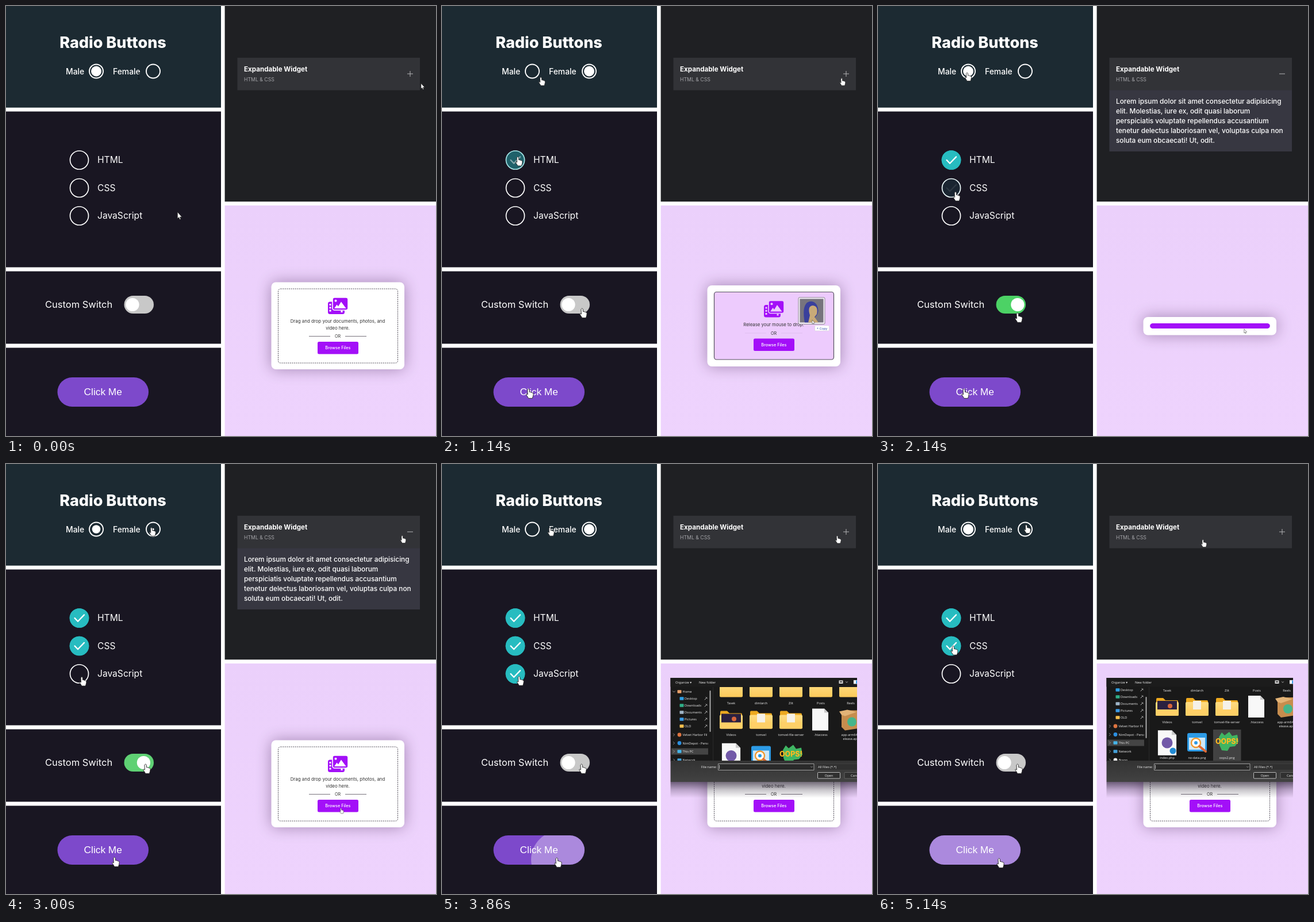
These frames come from a looping animation (748x748 px, 5280 ms). An HTML page with a canvas:

```html
<!DOCTYPE html>
<html lang="en">
<head>
<meta charset="utf-8">
<title>UI widgets</title>
<style>
html, body { margin: 0; width: 100%; height: 100%; overflow: hidden; background: #fff; }
canvas { display: block; }
</style>
</head>
<body>
<canvas id="stage" width="748" height="748"></canvas>
<script>
const ctx = document.getElementById('stage').getContext('2d');
const LOOP = 5280, STEPS = 37;
const PURPLE = '#a30ff8', TEAL = '#27bcc0', NIGHT = '#191622';
const UI = 'Inter, sans-serif', SYS = '"Open Sans", sans-serif', ARIAL = '"Liberation Sans", Arial, sans-serif';

// ---------- helpers ----------
const ramp = (k, start, len) => Math.max(0, Math.min(1, (k - start) / len));
const mix = (a, b, p) => a + (b - a) * p;
const mixRgb = (a, b, p) => `rgb(${a.map((v, i) => Math.round(mix(v, b[i], p)))})`;

function rect(x, y, w, h, fill, r = 0, stroke, lw = 1) {
  ctx.beginPath();
  ctx.roundRect(x, y, w, h, r);
  paint(fill, stroke, lw);
}
function circle(x, y, r, fill, stroke, lw = 1) {
  ctx.beginPath();
  ctx.arc(x, y, Math.max(0, r), 0, 7);
  paint(fill, stroke, lw);
}
function shape(d, x, y, scale, fill, stroke, lw = 1) {
  ctx.save();
  ctx.translate(x, y);
  ctx.scale(scale, scale);
  const p = new Path2D(d);
  ctx.lineJoin = ctx.lineCap = 'round';
  if (fill) { ctx.fillStyle = fill; ctx.fill(p); }
  if (stroke) { ctx.strokeStyle = stroke; ctx.lineWidth = lw; ctx.stroke(p); }
  ctx.restore();
}
function paint(fill, stroke, lw) {
  if (fill) { ctx.fillStyle = fill; ctx.fill(); }
  if (stroke) { ctx.strokeStyle = stroke; ctx.lineWidth = lw; ctx.stroke(); }
}
function fade(y0, y1, ...colors) {
  const g = ctx.createLinearGradient(0, y0, 0, y1);
  colors.forEach((c, i) => g.addColorStop(i / (colors.length - 1), c));
  return g;
}
// y is the middle of the capitals
function text(s, x, y, size, { color = '#fff', weight = 400, align = 'left', font = UI } = {}) {
  ctx.font = `${weight} ${size}px ${font}`;
  ctx.textAlign = align;
  ctx.fillStyle = color;
  ctx.fillText(s, x, y + size * .36);
}
function clipped(x, y, w, h, draw, r = 0) {
  ctx.save();
  ctx.beginPath();
  ctx.roundRect(x, y, w, h, r);
  ctx.clip();
  draw();
  ctx.restore();
}
// keys: [step, x, y, kind]; returns the interpolated place or null
function along(keys, k) {
  if (k < keys[0][0]) return null;
  const i = keys.findLastIndex(key => key[0] <= k);
  const a = keys[i], b = keys[i + 1] || a;
  const p = b === a ? 0 : (k - a[0]) / (b[0] - a[0]);
  return { x: mix(a[1], b[1], p), y: mix(a[2], b[2], p), kind: a[3] };
}

// ---------- pointers ----------
const POINTERS = {
  hand: 'M-3.5 -6Q-2 -8.5 -.7 -6L-.5 -2Q1 -3 2 -1.5Q3.5 -2 4 -.8Q5.5 -1 5.5 1L5 4L4 7.5H-2L-5.5 2Q-6 0 -3.5 1.5Z',
  arrow: 'M-3.5 -6V4.5L-1.3 2.6L.3 6L2 5.3L.5 2L3.6 1.8Z',
  beam: 'M-1.5 -5H1.5M0 -5V5M-1.5 5H1.5'
};
const TRACKS = {
  radio: [[0, 231, 122, 'beam'], [1, 240, 119, 'hand'], [3, 255, 117, 'hand'], [5, 255, 117, 'hand'],
    [8, 174, 131, 'hand'], [11, 157, 120, 'hand'], [15, 157, 123, 'hand'], [17, 180, 120, 'hand'],
    [20, 255, 118, 'hand'], [25, 255, 117, 'hand'], [28, 157, 118, 'hand'], [32, 157, 118, 'hand'], [36, 260, 113, 'hand']],
  checks: [[0, 302, 365, 'arrow'], [2, 260, 340, 'arrow'], [6, 134, 270, 'hand'], [9, 134, 270, 'hand'],
    [13, 137, 328, 'hand'], [15, 137, 331, 'hand'], [18, 134, 378, 'hand'], [25, 134, 378, 'hand'],
    [30, 140, 376, 'hand'], [33, 138, 374, 'hand'], [36, 133, 324, 'hand']],
  toggle: [[3, 250, 546, 'arrow'], [4, 248, 540, 'hand'], [8, 246, 534, 'hand'], [15, 245, 542, 'hand'], [20, 245, 530, 'hand']],
  button: [[3, 150, 688, 'hand'], [6, 153, 674, 'hand'], [15, 152, 674, 'hand'], [19, 191, 692, 'hand'],
    [25, 191, 692, 'hand'], [29, 213, 694, 'hand']],
  widget: [[0, 725, 140, 'arrow'], [2, 716, 136, 'hand'], [5, 697, 132, 'hand'], [10, 697, 132, 'hand'],
    [13, 728, 140], [18, 724, 150, 'arrow'], [19, 706, 136, 'hand'], [20, 691, 131, 'hand'], [25, 691, 131, 'hand'],
    [30, 687, 132, 'hand'], [33, 685, 132, 'hand'], [36, 567, 138, 'hand']],
  upload: [[9, 644, 549, 'arrow'], [15, 639, 566, 'arrow'], [17, 630, 575, 'arrow'], [20, 584, 604, 'hand'],
    [23, 584, 602, 'arrow'], [26, 584, 602]]
};
function pointer(name, k, scale = 1) {
  const at = along(TRACKS[name], k);
  if (!at || !at.kind) return;
  const beam = at.kind === 'beam';
  shape(POINTERS[at.kind], at.x, at.y, scale, beam ? null : '#fff', beam ? '#0a1014' : '#222', .8);
}

// ---------- left column ----------
function radios(k) {
  rect(0, 0, 374, 176.7, '#1c2a32');
  text('Radio Buttons', 186, 63.5, 27, { weight: 800, align: 'center' });
  const clicks = [3, 12, 20.7, 28.5], lens = [2, 2, 1.6, 1.5];
  const female = clicks.reduce((sum, c, i) => sum + ramp(k, c, lens[i]) * (i % 2 ? -1 : 1), 0);
  [['Male', 104, 157, 1 - female], ['Female', 186, 256, female]].forEach(([label, tx, cx, on], i) => {
    text(label, tx, 113.5, 13.9, { weight: 500 });
    const pressed = clicks.some((c, n) => n % 2 !== i && k - c > .5 && k - c < 2);
    if (pressed) circle(cx, 113.5, 18, 'rgba(255,255,255,.33)');
    circle(cx, 113.5, 12, null, '#fff', 1.9);
    circle(cx, 113.5, 9 * on, '#fff');
  });
  pointer('radio', k);
}

function checks(k) {
  rect(0, 183.6, 374, 270.9, NIGHT);
  const on = [ramp(k, 7.5, 1.1), ramp(k, 14.9, 1.1), ramp(k, 21.3, 1.1) - ramp(k, 32, 1)];
  ['HTML', 'CSS', 'JavaScript'].forEach((label, i) => {
    const y = 268 + 48.5 * i;
    circle(127.5, y, 16, null, mixRgb([255, 255, 255], [39, 188, 192], on[i] === 1 ? 1 : 0), 1.7);
    ctx.globalAlpha = on[i];
    circle(127.5, y, 16.8, TEAL);
    shape('M-8 0L-2.5 5.8L8.5 -5.6', 127.5, y, 1, null, '#fff', 2.3);
    ctx.globalAlpha = 1;
    text(label, 159, y - .5, 15.6);
  });
  pointer('checks', k, 1.08);
}

function toggle(k) {
  rect(0, 461.4, 374, 126.1, NIGHT);
  text('Custom Switch', 68, 519, 16.5);
  const on = ramp(k, 10, 2) - ramp(k, 20.7, 2);
  rect(205.5, 504, 51.5, 31, mixRgb([200, 200, 200], [76, 210, 101], on), 15.5);
  circle(mix(220, 242.8, on), 519.5, 11.6, '#fff');
  pointer('toggle', k, 1.12);
}

function button(k) {
  rect(0, 594.4, 374, 153.6, NIGHT);
  clipped(89.5, 646, 158.5, 51, () => {
    rect(89, 645, 160, 53, '#7d49cb');
    circle(170, 685, 85 * ramp(k, 16, 3), `rgba(255,255,255,${.35 * (1 - ramp(k, 18, 2.5))})`);
    circle(205, 688, 150 * ramp(k, 26, 3), 'rgba(255,255,255,.35)');
  }, 25.5);
  text('Click Me', 168.7, 671, 17.3, { align: 'center', font: ARIAL });
  pointer('button', k, 1.12);
}

// ---------- expandable widget ----------
const LOREM = ['Lorem ipsum dolor sit amet consectetur adipisicing', 'elit. Molestias, iure ex, odit quasi laborum',
  'perspiciatis voluptate repellendus accusantium', 'tenetur delectus laboriosam vel, voluptas culpa non',
  'soluta eum obcaecati! Ut, odit.'];
function widget(k) {
  rect(380.6, 0, 367.4, 340.2, '#1f2023');
  const open = ramp(k, 9, 2) - ramp(k, 21.5, 2);
  clipped(402.5, 146, 317.5, 107 * open, () => {
    rect(402, 146, 319, 107, '#373741');
    LOREM.forEach((line, i) => text(line, 414, 166 + 17 * i, 11.8, { weight: 500 }));
  });
  rect(402.5, 90, 317.5, 56.5, '#323337');
  text('Expandable Widget', 414, 109.5, 11.6, { weight: 700 });
  text('HTML & CSS', 414, 127.5, 8.7, { color: '#a4a4a8' });
  rect(698, 117.5, 10, 1, '#b4b4b6');
  if (open < .5) rect(702.5, 113, 1, 10, '#b4b4b6');
  pointer('widget', k, .88);
}

// ---------- upload ----------
function photoIcon(x, y, gap) {
  rect(x - 17, y - 7, 29, 21.5, PURPLE, 3.5);
  for (let i = 0; i < 3; i++) rect(x - 14.5, y - 3.5 + i * 5.3, 3, 3, gap, .6);
  rect(x + 5.5, y + 8.5, 3, 3, gap, .6);
  rect(x - 9, y - 14.5, 27, 22, PURPLE, 3.5, gap, 1.6);
  shape('M-6 4.5L-1.5 -2L1 1L6 -7L14.5 4.5Z', x, y, 1, gap);
  circle(x - 3.5, y - 8.8, 2, gap);
}

function panel(top, height) {
  ctx.save();
  ctx.shadowColor = 'rgba(60,30,75,.42)';
  ctx.shadowBlur = 27;
  rect(461.5, top, 231.5, height, '#fff', 8);
  ctx.restore();
}

function form(dragging) {
  const top = dragging ? 486 : 480.5, dark = { color: '#333', align: 'center' };
  panel(top, dragging ? 141 : 151.5);
  ctx.setLineDash(dragging ? [] : [2.2, 1.4]);
  rect(473.5, top + 11.5, 208, dragging ? 117.5 : 129, dragging ? '#edcbfd' : null, 4, '#55505c', dragging ? 1.2 : 1);
  ctx.setLineDash([]);
  photoIcon(577, top + 41, dragging ? '#edcbfd' : '#fff');
  if (dragging) text('Release your mouse to drop.', 577, 554, 7.8, dark);
  else {
    text('Drag and drop your documents, photos, and', 577, 548.5, 7.9, dark);
    text('video here.', 577, 559.7, 7.9, dark);
  }
  const y = dragging ? 569 : 574.5;
  text('OR', 577, y, 7.2, dark);
  for (const x of [527, 590]) rect(x, y - .5, 37, 1, dragging ? '#e0c0ef' : '#77727c');
  rect(542, y + 9.5, 71, 21.5, PURPLE, 2.5);
  text('Browse Files', 577.3, y + 20, 7.3, { weight: 500, align: 'center' });
}

function dragged(x, y) {
  rect(x - 23, y - 23, 46, 46.5, '#f4eef8', 2, '#777', .8);
  clipped(x - 20.5, y - 20.5, 41, 41, () => {
    rect(x - 21, y - 21, 42, 42, '#77747e');
    shape('M-12 21Q-17 -6 -8 -14Q2 -20 9 -10Q14 0 9 8L-2 21Z', x, y, 1, '#3a409c');
    shape('M-6 21L-3 8Q-8 -8 2 -9Q12 -8 9 6L5 11L12 21Z', x, y, 1, '#c9aa78');
  });
  rect(x + 5.5, y + 26, 25, 9, '#fff', 1, '#ccc', .5);
  text('+ Copy', x + 18, y + 30.5, 5.8, { color: '#2340a8', align: 'center', font: SYS });
}

function folder(x, y) {
  shape('M-19 14V-13Q-19 -15 -17 -15H-7L-3 -11H17Q19 -11 19 -9V14Z', x, y, 1, '#eda91f');
  rect(x - 20, y - 8, 40, 24, fade(y - 8, y + 16, '#ffdc82', '#fcc95a'), 2);
}
function page(x, y, scale = 1) {
  shape('M-14 -19H7L14 -12V19H-14Z', x, y, scale, '#f8f8f8');
  shape('M7 -19V-12H14Z', x, y, scale, '#c9c9c9');
}
function carton(x, y) {
  shape('M-16 -8L-8 -16H12L16 -10V15L-10 19L-16 13Z', x, y, 1, '#c68d4e');
  shape('M-16 -8L-20 -14L-6 -17L10 -13L-10 -6Z', x, y, 1, '#e2b377');
  circle(x + 2, y + 4, 8, '#46b58b');
}
function browserPicture(x, y) {
  rect(x - 17, y - 17, 34, 32, '#2d9be6', 3);
  rect(x - 14, y - 9, 28, 21, '#cfe8f7');
  circle(x - 2, y, 8, '#fff', '#f2992e', 2.4);
  circle(x - 2, y, 3, '#2d9be6');
  shape('M4 6L15 15', x, y, 1, null, '#e06a35', 4);
}
function burstPicture(x, y) {
  shape('M-14 -8L-9 -16L-4 -11L4 -17L9 -10L18 -12L20 0L14 8L5 9L1 16L-9 15L-13 6Z', x, y, 1, '#3fb562');
  text('OOPS!', x, y - 1, 12.5, { color: '#ffb81f', weight: 800, align: 'center' });
}

const NAMES = [['Tavek', 'dimlarch', 'Zilt', 'Posts', 'Reels'],
  ['Videos', 'tomvel', 'tomvel-file-server', '.htaccess', 'app-arm64-v'],
  ['index.php', 'no-data.png', 'oops2.png']];
function files(k) {
  const shift = -45 * ramp(k, 26, 2), loaded = k >= 26;
  const label = { align: 'center', font: SYS, color: '#eee' };
  if (k >= 29) rect(k < 33 ? 479 : 583, 507 + shift, 48.5, 60, '#424242');
  NAMES.forEach((row, r) => row.forEach((name, c) => {
    const x = 503 + 52 * c, y = [412, 467, 530][r] + shift;
    if (r === 2) {
      if (!loaded || c === 0) page(x, y, 1.15);
      if (loaded && c === 0) { circle(x, y, 9.5, '#7259a8'); circle(x + 10, y + 14, 5.5, '#238bd4'); }
      if (loaded && c === 1) browserPicture(x, y);
      if (loaded && c === 2) burstPicture(x, y - 2);
    } else if (r === 1 && c === 3) page(x - 1, y);
    else if (r === 1 && c === 4) carton(x, y);
    else {
      folder(x, y);
      if (loaded && r === 1) {
        rect(x - (c ? 7 : 17), y - 10, c ? 14 : 34, 17, c ? '#f5f1e8' : '#2b2140');
        if (!c) circle(x + 5, y - 1, 4, '#d7663c');
        rect(x - 20, y + 5, 40, 11, '#ffd067', 2);
      }
    }
    text(name, x, [439, 494, 556][r] + shift, 5.5, label);
  }));
  text('elease.apk', 711, 501 + shift, 5.5, label);
}

const PLACES = [['Home', 396, '#e8a06a'], ['Desktop', 408, '#2f9fe4'], ['Downloads', 420, '#2fae87'],
  ['Documents', 432, '#9fb4c6'], ['Pictures', 444, '#3b9be6'], ['OLD', 456, '#f6c04f'],
  ['Velvet Harbor Fil', 471, '#dd7440'], ['NimDepot - Person', 485.5, '#2c8fe0'], ['This PC', 500, '#45b4e8'],
  ['Network', 515, '#45a0d8'], ['Brano', 530, '#eee']];
function sidebar(k) {
  const p = ramp(k, 32, 2);
  PLACES.forEach(([name, y0, color], i) => {
    const y = y0 - 15 * p, sub = i > 0 && i < 6;
    if (name === 'This PC') rect(399, y - 5.5, 64, 11, '#444');
    if (sub) shape('M-2 2L2 -2M0 -2.5L2.5 0', 459, y, 1, null, '#bbb', 1);
    else shape(i ? 'M-1 -2L1 0L-1 2' : 'M-2 -1L0 1L2 -1', 403.5, y, 1, null, '#aaa', .8);
    if (i === 6 || i === 7 || i === 10) circle(413, y, 3.4, color);
    else rect((sub ? 417 : 413) - 3.5, y - 2.8, 7, 5.6, color, 1);
    clipped(397, y - 6, 66, 12, () => text(name, sub ? 422 : 418.5, y, 5.6, { font: SYS, color: '#eee' }));
  });
  rect(465.5, 394 + 11 * p, 2, 72, '#aaa', 1);
}

function dialog(k) {
  rect(397.5, 553, 324.5, 28, fade(553, 581, 'rgba(30,20,40,.62)', 'rgba(30,20,40,.24)', 'rgba(30,20,40,0)'));
  clipped(397.5, 372, 324.5, 181, () => {
    const sys = { font: SYS, color: '#eee' };
    rect(397, 372, 326, 145, '#191919');
    clipped(472, 388, 250, 128, () => files(k));
    clipped(397, 388, 74, 128, () => sidebar(k));
    rect(471, 388, .7, 128, '#333');
    rect(397, 372, 326, 15.5, '#1c1c1c');
    if (k >= 25) {
      text('Organize ▾', 406, 379.5, 5.7, sys);
      text('New folder', 447, 379.5, 5.7, sys);
      rect(690.5, 376.5, 7, 5.5, '#ddd');
      rect(692, 378, 4, 2, '#444');
      shape('M-1.5 -.8L0 .8L1.5 -.8', 704, 379.5, 1, null, '#ccc', .8);
    }
    rect(716, 376, 7, 6.5, '#fff');
    rect(720, 376.5, 3, 5.5, '#3a9de8');
    rect(397, 516, 326, 37, fade(516, 553, '#333', '#424242'));
    text('File name:', 478, 527, 5.7, { ...sys, align: 'right' });
    rect(480.5, 521.5, 166.5, 11, '#2a2a2a', 0, '#aaa', .9);
    rect(482, 523.5, .7, 7, '#fff');
    shape('M-1.5 -.8L0 .8L1.5 -.8', 643, 527, 1, null, '#aaa', .7);
    rect(651, 521.5, 80, 11, '#303030', 0, '#444', .7);
    text('All Files (*.*)', 654, 527, 5.7, sys);
    rect(653.5, 536.5, 39, 10.5, '#303030', 1, '#ccc', .9);
    text('Open', 673, 541.8, 5.7, { ...sys, align: 'center' });
    rect(700, 536.5, 39, 10.5, '#303030', 1, '#777', .7);
    text('Cancel', 711, 541.8, 5.7, sys);
  });
}

function upload(k) {
  rect(380.6, 347, 367.4, 401, fade(347, 748, '#ebd0fb', '#eed3fd'));
  if (k >= 9 && k < 18) {
    panel(541, 31.5);
    clipped(473, 552, 209 * ramp(k, 9, 5), 9, () => rect(473, 552, 209, 9, PURPLE, 4.5), 4.5);
  } else form(k >= 6 && k < 9);
  if (k >= 3 && k < 9) {
    const at = along([[3, 690, 590], [8, 643, 530]], k);
    clipped(381, 347, 341, 401, () => dragged(at.x, at.y));
    shape(POINTERS.arrow, at.x + 3, at.y + 20, .6, '#fff', '#333', .8);
  }
  if (k >= 23) dialog(k);
  pointer('upload', k, .62);
}

// ---------- loop ----------
const begin = performance.now();
function frame() {
  const t = (performance.now() - begin) % LOOP;
  const k = Math.min(STEPS - 1, Math.floor((t + 4) * STEPS / LOOP));
  rect(0, 0, 748, 748, '#fff');
  [radios, checks, toggle, button, widget, upload].forEach(draw => draw(k));
  requestAnimationFrame(frame);
}
frame();
</script>
</body>
</html>
```
